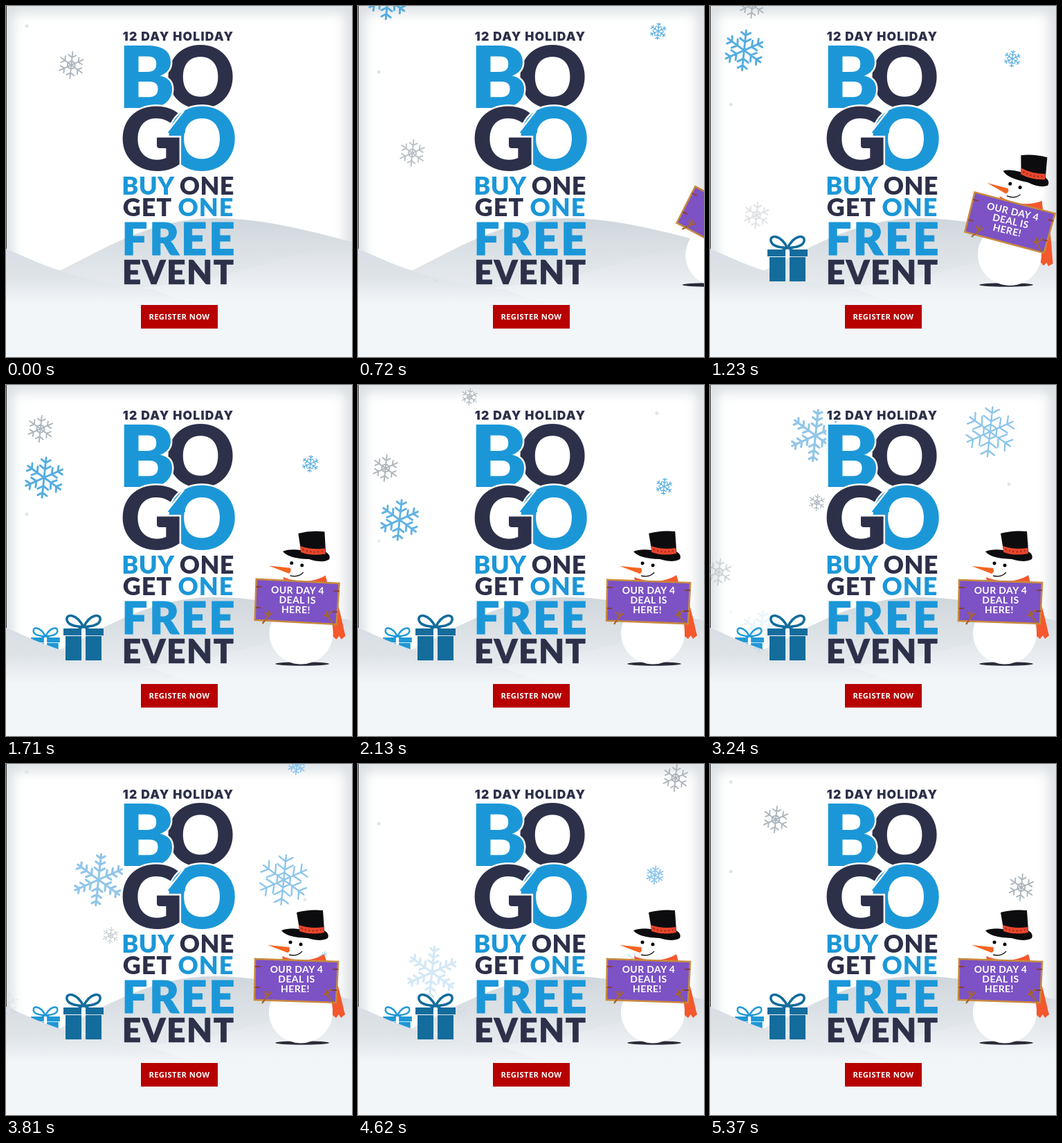
Animation, 500 px wide and 506 px high, one loop 5.4 s. Source, as an HTML page:

```html
<!DOCTYPE html>
<html lang="en">
<head>
<meta charset="utf-8">
<title>Holiday event</title>
<style>
  html, body { margin: 0; width: 100%; height: 100%; overflow: hidden; background: #f3f6f9; }
  svg { display: block; width: 500px; height: 506px; }
  text { fill: #2d3049; }
  .b { fill: #1b97d8; }
  .head { font-family: Lato, sans-serif; font-weight: 900; text-anchor: middle; }
  .big { font: 900 123px Lato, sans-serif; stroke: #fff; stroke-width: 5; paint-order: stroke; }
  .sign text { font: 700 14px Lato, sans-serif; letter-spacing: .4px; text-anchor: middle; fill: #fff; }
  .cta { font: 700 11.2px "Open Sans", sans-serif; letter-spacing: .4px; text-anchor: middle; fill: #fff; }
</style>
</head>
<body>
<svg viewBox="0 0 500 506">
  <defs>
    <filter id="soft" x="-10%" y="-10%" width="120%" height="120%"><feGaussianBlur stdDeviation="9"/></filter>
    <linearGradient id="back" gradientUnits="userSpaceOnUse" x1="0" y1="306" x2="0" y2="400">
      <stop stop-color="#d0d7dc"/><stop offset="1" stop-color="#e6eaee"/>
    </linearGradient>
    <linearGradient id="right" gradientUnits="userSpaceOnUse" x1="0" y1="350" x2="0" y2="425">
      <stop stop-color="#dce1e6"/><stop offset="1" stop-color="#f3f6f9"/>
    </linearGradient>
    <linearGradient id="left" gradientUnits="userSpaceOnUse" x1="0" y1="350" x2="0" y2="430">
      <stop stop-color="#d8dee3"/><stop offset=".5" stop-color="#dde3e7"/><stop offset="1" stop-color="#f3f6f9"/>
    </linearGradient>
    <clipPath id="low"><rect x="218" y="184" width="60" height="70"/></clipPath>
    <g id="gift">
      <path d="M-26-35H-3V0H-26zM3-35H26V0H3zM-29-46H-3V-36H-29zM3-46H29V-36H3z" fill="currentColor"/>
      <path d="M0-48C-10-68-26-68-24-58C-22-50-10-49 0-48C10-49 22-50 24-58C26-68 10-68 0-48M-3-47L-10-43M3-47L10-43"
        fill="none" stroke="currentColor" stroke-width="3.5"/>
    </g>
  </defs>

  <rect width="500" height="506" fill="#fff"/>
  <rect width="500" height="620" fill="#fff" stroke="#d3d9dd" stroke-width="18" filter="url(#soft)"/>
  <path d="M50 394C130 360 200 306 300 306C375 306 440 325 500 340V440H50z" fill="url(#back)"/>
  <path d="M130 412C250 404 340 386 400 363C430 353 470 350 500 352V440H130z" fill="url(#right)"/>
  <use id="small" href="#gift" color="#1f98d6"/>
  <path d="M0 350C40 366 90 396 210 408L300 440H0z" fill="url(#left)"/>
  <rect y="430" width="500" height="76" fill="#f3f6f9"/>
  <rect width="1" height="350" fill="#3a3a3a"/>

  <g id="flakes" fill="none" stroke-linecap="round"></g>

  <g class="head">
    <text x="249" y="50" style="font:900 17.5px Inter,sans-serif;letter-spacing:1.2px">12 DAY HOLIDAY</text>
    <text x="248.5" y="272" font-size="36" letter-spacing=".4"><tspan class="b">BUY</tspan> ONE</text>
    <text x="249" y="303" font-size="36" letter-spacing="1">GET <tspan class="b">ONE</tspan></text>
    <text x="250.5" y="359" font-size="65" letter-spacing="3" class="b" stroke="#1b97d8">FREE</text>
    <text x="249" y="401" font-size="48" letter-spacing="1.4" stroke="#2d3049" stroke-width=".6">EVENT</text>
  </g>
  <g class="big">
    <text x="281" y="147" text-anchor="middle">O</text>
    <text x="162" y="147" class="b">B</text>
    <g style="font-size:126px">
      <text x="165" y="237">G</text>
      <text x="283" y="237" text-anchor="middle" class="b">O</text>
      <path d="M233 183L257 153L259 183z" class="b" stroke="none"/>
      <path d="M231 184L257 151" stroke-width="2.5"/>
      <text x="165" y="237" clip-path="url(#low)">G</text>
    </g>
  </g>
  <rect x="195" y="431" width="111" height="34" fill="#b80000"/>
  <text class="cta" x="250.5" y="452">REGISTER NOW</text>

  <use id="large" href="#gift" color="#146c9c"/>

  <g id="snowman">
    <ellipse cx="428" cy="402" rx="39" ry="2.8" fill="#2b2b38"/>
    <g id="figure">
      <path d="M455 281C478 296 482 330 490 361L484 366L481 361L477 366L472 362C472 330 466 305 450 294z" fill="#f4582c"/>
      <ellipse cx="426" cy="358" rx="46" ry="44.5" fill="#fff"/>
      <ellipse cx="427" cy="302" rx="37" ry="33" fill="#fff"/>
      <ellipse cx="431" cy="261" rx="30" ry="23" fill="#fff"/>
      <path d="M399 277C420 286 445 284 460 274L464 288C445 295 415 294 401 288z" fill="#f4582c"/>
      <path d="M378 261L409 264Q412 269 407 272z" fill="#f26522"/>
      <circle cx="411" cy="257" r="2.5"/><circle cx="426" cy="260" r="2.5"/>
      <path d="M409 275Q421 278 428 270" fill="none" stroke="#222" stroke-width="1.4"/>
      <path d="M398 240Q408 236 424 238L420 214Q438 209 458 211L460 240Q468 245 465 251Q455 257 436 251Q405 250 398 240z" fill="#0c0c0f"/>
      <path d="M423 232Q440 238 459 235L460 243Q440 247 424 241z" fill="#e8452c"/>
      <path d="M427 237Q441 243 455 239" fill="none" stroke="#5c1a16" stroke-width="1.5" stroke-dasharray="1.5 4"/>
      <g id="board" class="sign">
        <path d="M360 281L480 285L477 344L359 340z" fill="#7c52c4" stroke="#c98a3c" stroke-width="2.5"/>
        <path d="M360 292H368M360 322H367M472 296H480M471 326H478" stroke="#8a4034" stroke-width="2"/>
        <text x="420" y="301">OUR DAY 4</text>
        <text x="420" y="315">DEAL IS</text>
        <text x="418" y="329">HERE!</text>
        <path d="M370 345L378 334L373 328M378 334L384 329M378 334V326M473 343L464 333L458 331M464 333L462 325M464 333L470 324"
          fill="none" stroke="#a5652f" stroke-width="2.2"/>
      </g>
    </g>
  </g>
</svg>
<script>
const LOOP = 5400;
const el = id => document.getElementById(id);
const clamp = v => Math.max(0, Math.min(1, v));

// Six arms of unit length; evenly spaced pairs of branches shorten towards the tip.
function flakePath(pairs, length, ring) {
  let d = '';
  for (let i = 0; i < 6; i++) {
    const at = (r, turn = 0, len = 0) => {
      const a = i * Math.PI / 3 - Math.PI / 2;
      return `${r * Math.cos(a) + len * Math.cos(a + turn)} ${r * Math.sin(a) + len * Math.sin(a + turn)}`;
    };
    d += `M0 0L${at(1)}`;
    for (let n = 1; n <= pairs; n++) {
      const r = n / (pairs + 1) + .08, len = length * (1.2 - .4 * r);
      d += `M${at(r, -1, len)}L${at(r)}L${at(r, 1, len)}`;
    }
    if (ring) d += `M${at(ring)}L${at(0, Math.PI / 3, ring)}`;
  }
  return d;
}

const kinds = {
  grey: { d: flakePath(1, .35, .32), stroke: '#adb5bd', width: .1 },
  blue: { d: flakePath(2, .3), stroke: '#55ade0', width: .1 },
  leafy: { d: flakePath(3, .22), stroke: '#92c6e8', width: .085 },
  lace: { d: flakePath(2, .36, .3), stroke: '#8cc5ea', width: .065 },
  star: { d: flakePath(1, .4, .5), stroke: '#8cc6ec', width: .13 },
  dot: { d: 'M0 0h.01', stroke: '#e1e6ea', width: 2 }
};
const flakes = [];

// Crosses the top edge at x when t = start, then moves by drift and speed in px/s.
function addFlake(kind, r, start, x, drift, speed) {
  const { d, stroke, width } = kinds[kind];
  const node = document.createElementNS('http://www.w3.org/2000/svg', 'path');
  node.setAttribute('d', d);
  node.setAttribute('stroke', stroke);
  node.setAttribute('stroke-width', width);
  el('flakes').append(node);
  flakes.push({ node, r, start, x, drift, speed });
}
addFlake('grey', 19, -483, 105, -22, 176);
addFlake('blue', 12, 256, 431, 6, 78);
addFlake('blue', 29, 790, 44, 12, 145);
addFlake('grey', 19, 1243, 61, -24, 135);
addFlake('grey', 12, 2006, 162, -6, 137);
addFlake('leafy', 37, 2800, 167, -33, 165);
addFlake('lace', 36, 2856, 407, -6, 175);
addFlake('star', 13, 3800, 420, 11, 195);
addFlake('grey', 19, 4525, 460, -12, 210);
for (let i = 0; i < 3; i++) addFlake('dot', 2.5, 2000 * i - 313, i % 2 ? 432 : 30, 0, 92);

function drawFlake({ node, r, start, x, drift, speed }, t) {
  const enter = start - 1000 * r / speed;
  const age = (t - LOOP >= enter ? t - LOOP - start : t - start) / 1000;
  const y = age * speed;
  node.setAttribute('opacity', y < -r ? 0 : clamp((380 - y) / 200));
  node.setAttribute('transform', `translate(${x + drift * age} ${y}) rotate(6) scale(${r})`);
}

// Grows from the ground with a small overshoot.
function popGift(id, x, size, start, t) {
  const p = clamp((t - start) / 380) - 1;
  const s = t < start ? 0 : size * (1 + 2.7 * p ** 3 + 1.7 * p * p);
  el(id).setAttribute('transform', `translate(${x} 397) scale(${s})`);
}

function draw() {
  const t = performance.now() % LOOP;
  for (const flake of flakes) drawFlake(flake, t);
  popGift('large', 112, 1, 720, t);
  popGift('small', 57, .72, 1270, t);

  const slide = 150 * (1 - clamp((t - 620) / 530)) ** 3;
  const lean = Math.min(2, Math.exp((1230 - t) / 190));
  el('snowman').style.display = t < 620 ? 'none' : '';
  el('snowman').setAttribute('transform', `translate(${slide} 0)`);
  el('figure').setAttribute('transform', `rotate(${9 * lean} 427 402)`);
  el('board').setAttribute('transform', `rotate(${4 * lean} 420 312)`);
  requestAnimationFrame(draw);
}
draw();
</script>
</body>
</html>
```
